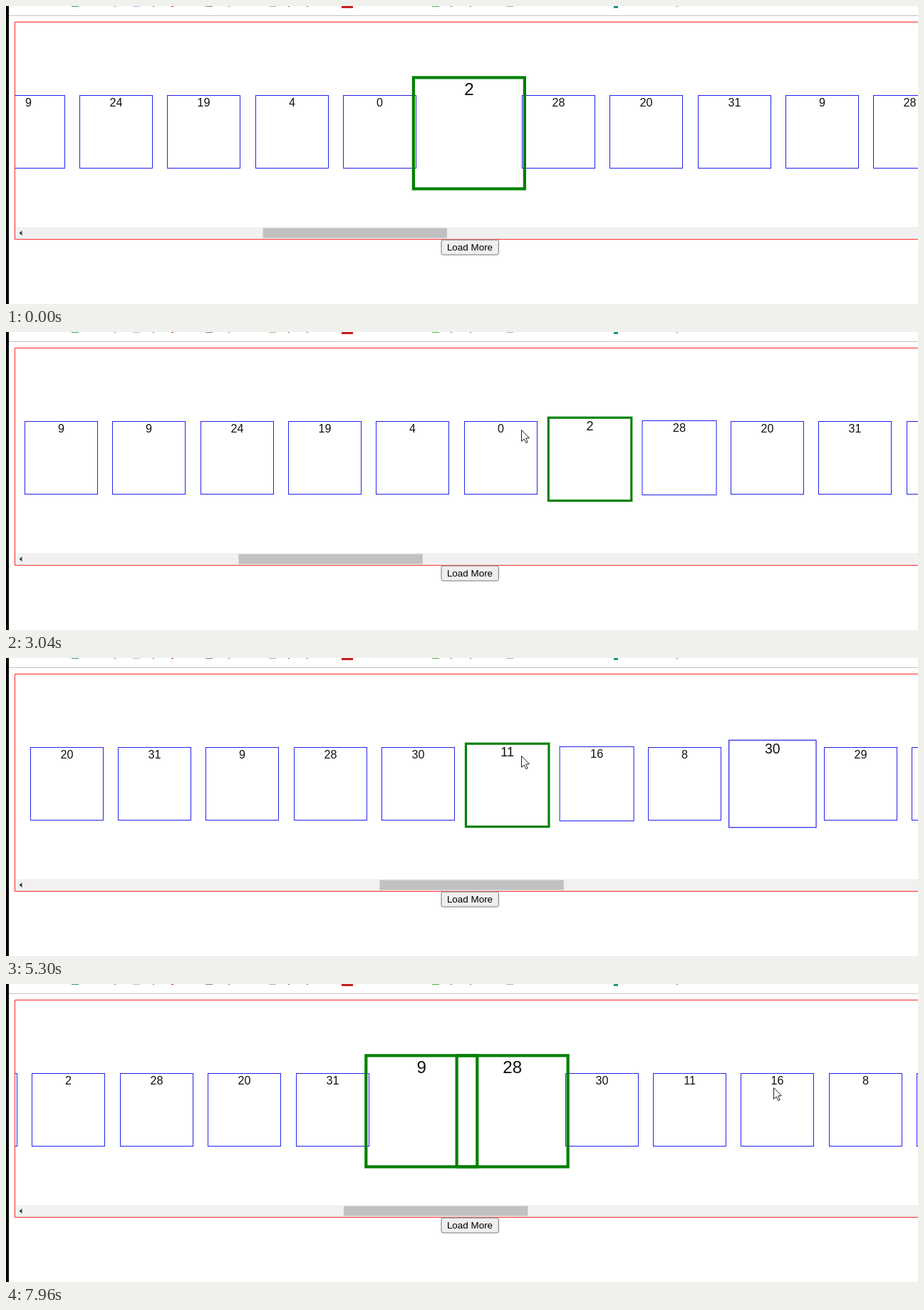
Recreate the animation shown at these times as an HTML page. Size 1280 by 418 pixels, loop 8 s.

```html
<!DOCTYPE html>
<html lang="en">
<head>
<meta charset="utf-8">
<title>Scroll list</title>
<style>
  html, body { margin: 0; width: 100%; height: 100%; overflow: hidden; background: #fff; }
  svg { display: block; width: 100%; height: 100%; font-family: Arial, "Liberation Sans", sans-serif; }
</style>
</head>
<body>
<svg viewBox="0 0 1280 418" xmlns="http://www.w3.org/2000/svg">
  <defs><clipPath id="view"><rect x="13" y="23" width="1267" height="287"/></clipPath></defs>
  <rect width="1280" height="418" fill="#fff"/>
  <g id="bar"></g>
  <rect x="4" y="13" width="1276" height="1" fill="#c4c4c4"/>
  <rect width="4" height="418" fill="#000"/>
  <rect x="13" y="310" width="1267" height="17" fill="#f1f1f1"/>
  <path d="M22.5 315v7l-4 -3.5z" fill="#404040"/>
  <rect id="thumb" y="311.5" width="258.4" height="14" fill="#c1c1c1"/>
  <path d="M1282 22.5H12.5V327.3H1282" fill="none" stroke="#f22"/>
  <rect x="611" y="328" width="80.4" height="21" rx="2.5" fill="#efefef" stroke="#767676"/>
  <text x="651" y="343.4" font-size="13.43" text-anchor="middle">Load More</text>
  <g id="boxes" clip-path="url(#view)"></g>
  <path id="cursor" d="M.5 .5V16.4L4.2 13L6.8 18.6L9.2 17.6L6.7 12L11.4 11.7Z" fill="#fff" stroke="#222"/>
</svg>
<script>
const LOOP = 8000, START = 1380, STEP = 69.2, LAST = 95;
const PITCH = 123.35, TOP = 125, SIZE = 103, BIG = 106.8;
const CENTER = 650, REST = 883.7;
const ENTER = 57, LEAVE = 68, LAG = 0.8;
const FIRST = -1;
const VALUES = [23, 11, 19, 32, 34, 15, 6, 9, 9, 24, 19, 4, 0, 2, 28, 20, 31, 9, 28, 30, 11,
  16, 8, 30, 29, 26, 24, 13, 35, 4, 19, 0, 17, 17, 18, 33, 37, 6, 32, 4, 21, 7];

// Scroll strokes: first step, last step, offset reached, skew (under 1 rushes early)
const STROKES = [
  [-1, 10, 3478, 0.7],
  [15, 35, -58, 0.45],
  [36, 48, 2125, 0.47],
  [50, 66, 385, 1.36],
  [69, 81, 1390, 0.7],
  [84, 90, 1443.7, 1]
];

const $ = id => document.getElementById(id);
const clamp = (v, a, b) => Math.min(b, Math.max(a, v));
const smooth = u => u * u * (3 - 2 * u);

function scrollAt(n) {
  let s = REST;
  for (const [a, b, to, skew] of STROKES) {
    s += (to - s) * smooth(clamp((n - a) / (b - a), 0, 1) ** skew);
  }
  return s;
}

// Items grow while near the centre and shrink after leaving it
function simulate() {
  let items = VALUES.map((_, k) => k + FIRST === 12 ? { scale: 1.5, on: true } : { scale: 1, on: false });
  const states = [items];
  for (let n = 0; n <= LAST; n++) {
    const middle = scrollAt(n - LAG) + CENTER - BIG / 2;
    items = items.map((it, k) => {
      const off = Math.abs((k + FIRST) * PITCH - middle);
      const on = off < (it.on ? LEAVE : ENTER);
      return { scale: clamp(it.scale + (on ? 0.12 : -0.1), 1, 1.5), on };
    });
    states.push(items);
  }
  return states;
}
const STATES = simulate();

const stepAt = t => t < START ? -1 : Math.min(LAST, Math.floor((t - START) / STEP + 0.4));

function boxMarkup(x, value, { scale, on }) {
  const size = on ? BIG : SIZE, line = on ? 2.8 : 1, half = size / 2, r = half - line / 2;
  const left = on || scale > 1 ? x : Math.round(x);
  return `<g transform="translate(${left + half} ${TOP + half}) scale(${scale})">`
    + `<rect x="${-r}" y="${-r}" width="${2 * r}" height="${2 * r}" fill="none"`
    + ` stroke="${on ? "#008000" : "#2222f0"}" stroke-width="${line}"/>`
    + `<text y="${line + 14.8 - half}" font-size="16.12" text-anchor="middle" fill="#111">${value}</text></g>`;
}

function drawList(n) {
  const s = scrollAt(n);
  let x = FIRST * PITCH - s, flat = "", raised = "";
  STATES[n + 1].forEach((it, k) => {
    if (x > -180 && x < 1330) {
      const m = boxMarkup(x, VALUES[k], it);
      if (it.on || it.scale > 1) raised += m; else flat += m;
    }
    x += PITCH + (it.on ? 4 : 0);
  });
  $("boxes").innerHTML = flat + raised;
  $("thumb").setAttribute("x", 360.7 + (s - REST) / 4.946);
}

function drawCursor(t, n) {
  const k = clamp(Math.floor((t - 70) / 60), 0, 4) / 4;
  const e = 1 - (1 - k) * (1 - k);
  const w = smooth(clamp((n - 86) / 8, 0, 1));
  const x = 1000 - 277 * e + 354 * w, y = 315 - 178 * e + 8 * w;
  $("cursor").setAttribute("transform", `translate(${x} ${y})`);
  $("cursor").setAttribute("visibility", t < 70 ? "hidden" : "visible");
}

// Cut-off lower edge of the bookmarks row: icons and letter tails
const mark = (x, w, h, color) => `<rect x="${x}" width="${w}" height="${h}" fill="${color}"/>`;
const ICONS = { 92: "#3a9b74", 178: "#a9c4d6", 280: "#888", 369: "#c5ab98", 598: "#5aa84f", 702: "#aab0b8" };
$("bar").innerHTML = Object.entries(ICONS).map(([x, c]) => mark(x, 10, 1, c)).join("")
  + [152, 206, 312, 396, 422, 624, 651, 941].map(x => mark(x, 2, 1, "#777")).join("")
  + mark(232, 3, 1, "#c33") + mark(471, 16, 3, "#c5221f") + mark(853, 6, 3, "#2a9080");

let shown = null;
function render(t) {
  const n = stepAt(t);
  if (n !== shown) drawList(shown = n);
  drawCursor(t, n);
}

function tick() {
  render(performance.now() % LOOP);
  requestAnimationFrame(tick);
}
tick();
</script>
</body>
</html>
```
